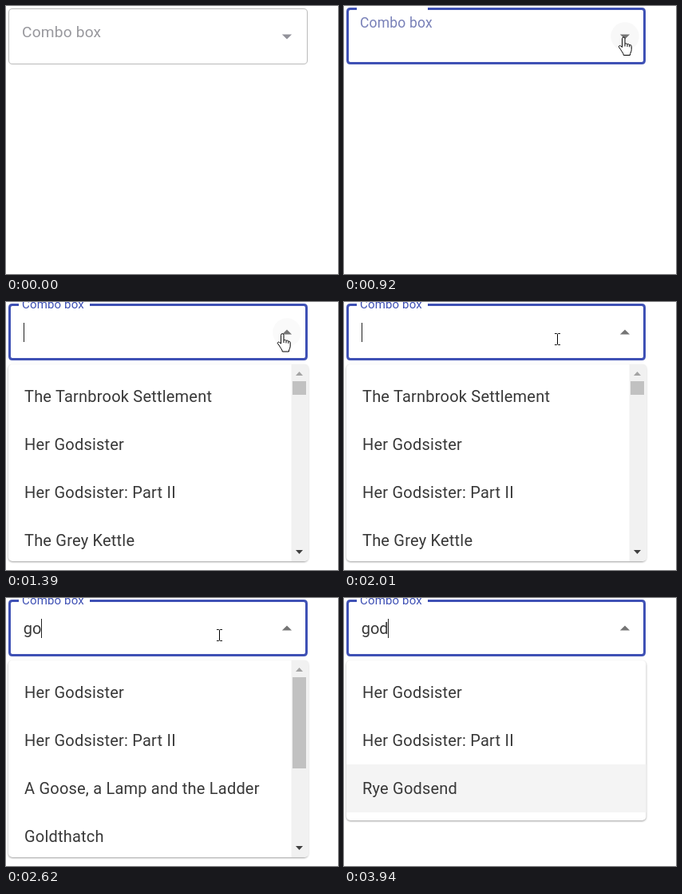
Write an HTML page that moves like this. It is 416 px wide and 335 px high and loops after 4440 ms.

```html
<!DOCTYPE html>
<html lang="en">
<head>
<meta charset="utf-8">
<title>Combo box</title>
<style>
  html, body { margin: 0; width: 100%; height: 100%; overflow: hidden; background: #fff; }
  svg { display: block; }
  text { font: 20px Roboto, Arial, sans-serif; letter-spacing: .21px; fill: #383838; white-space: pre; }
  #typed { letter-spacing: 0; }
  #sheet { filter: drop-shadow(0 1px 1.2px rgba(0, 0, 0, .38)); }
  .cursor { stroke: #000; fill: #fff; stroke-linejoin: round; }
</style>
</head>
<body>
<svg width="416" height="335" viewBox="0 0 416 335">
  <path id="frame" fill="none"/>
  <text id="label">Combo box</text>
  <text id="typed" x="21.7" y="45"></text>
  <rect id="caret" y="26" width="1" height="24" fill="#222"/>
  <circle id="ripple" cx="352" cy="38" r="17.8" fill="#f3f3f3"/>
  <path id="arrow" d="M-6.1-2.5H6.1L0 3.4Z"/>

  <g id="panel">
    <rect id="sheet" x="3" y="78" width="375.5" rx="5" fill="#fff"/>
    <rect id="hover" x="3" width="375.5" height="60" fill="#f4f4f4"/>
    <g id="rows"></g>
    <g id="bar">
      <path d="M357.5 78H374.5a5 5 0 0 1 5 5V319a5 5 0 0 1-5 5H357.5Z" fill="#f1f1f1"/>
      <path d="M363 92L367.5 87L372 92Z" fill="#a3a3a3"/>
      <path d="M363 310L367.5 315L372 310Z" fill="#404040"/>
      <rect id="thumb" x="359" y="99" width="17" fill="#c1c1c1"/>
    </g>
  </g>

  <g id="point" class="cursor">
    <path d="M0 0V20L4.6 15.7L7.6 22.5L10.6 21.2L7.7 14.5H14Z"/>
  </g>
  <g id="hand" class="cursor">
    <path d="M-1.4 13V2.3a1.7 1.7 0 0 1 3.4 0V9c.5-1 2.8-.8 3 .6c.6-.9 2.6-.6 2.8.8c.7-.6 2.4-.2 2.4 1.4V16c0 3-1.8 4-1.8 7H.3c0-2.5-2.5-4.5-3.6-7L-5.6 12.8c-.6-1 .9-2.5 2.3-1.3Z"/>
    <path d="M2 9V12M5 9.8V12.4M7.8 10.5V12.8" fill="none"/>
  </g>
  <g id="beam" class="cursor">
    <path d="M-3.5-6.5H-1L0-5.8L1-6.5H3.5M0-5.8V6.8M-3.5 7.5H-1L0 6.8L1 7.5H3.5" fill="none"/>
  </g>
</svg>
<script>
const LOOP = 4440;
const $ = id => document.getElementById(id);
const set = (id, attrs) => {
  for (const k in attrs) $(id).setAttribute(k, attrs[k]);
};
const show = (id, on) => { $(id).style.display = on ? '' : 'none'; };

const titles = [
  'The Tarnbrook Settlement', 'Her Godsister', 'Her Godsister: Part II',
  'The Grey Kettle', 'A Goose, a Lamp and the Ladder', 'Goldthatch', 'Rye Godsend'
];

// Each table holds [start, ...values]; a step lasts until the next one.
const cursorSteps = [
  [0, ''],
  [150, 'point', 318, 314], [220, 'point', 328, 235], [300, 'point', 336, 155],
  [370, 'point', 341, 95], [450, 'hand', 342.5, 58], [530, 'hand', 342.5, 48.5],
  [620, 'hand', 346.5, 42.5], [690, 'hand', 350, 38.5], [1390, 'hand', 346, 39],
  [1470, 'beam', 305.5, 43], [1550, 'beam', 267.5, 46], [3330, 'beam', 266.5, 46],
  [3400, 'hand', 277, 96], [3480, 'hand', 302, 170], [3550, 'hand', 335, 251],
  [3630, '']
];
const labelSteps = [
  [0, .172, '#98989d'], [70, 0, '#7a7a7a'], [920, .5, '#7880b8'],
  [1000, .88, '#6671b8'], [1080, .96, '#5a66b6'], [1150, 1, '#3f51b5']
];
const typedSteps = [[0, '', 17], [2320, 'g', 42], [2620, 'go', 114], [2870, 'god', 0]];
const caretSteps = [[0, 0], [1000, 1], [1470, 0], [2010, 1], [3400, 0], [3940, 1]];
const panelSteps = [[0, 0], [1000, .7], [1080, 1]];
const rippleSteps = [[0, 0], [920, .6], [1000, 1], [1230, .8], [1310, .6], [1390, .4], [1470, 0]];

const at = (steps, t) => steps.filter(s => s[0] <= t).pop().slice(1);

function outline(inset, top, bottom, gapStart, gapEnd) {
  const l = 3 + inset, r = 378 - inset, c = 5 - inset;
  return `M${gapStart} ${top}H${l + c}Q${l} ${top} ${l} ${top + c}V${bottom - c}` +
    `Q${l} ${bottom} ${l + c} ${bottom}H${r - c}Q${r} ${bottom} ${r} ${bottom - c}` +
    `V${top + c}Q${r} ${top} ${r - c} ${top}H${gapEnd}`;
}

function drawField(t) {
  const focused = t >= 920;
  const [lift, tint] = at(labelSteps, t);
  const scale = 1 - .25 * lift;
  const baseline = 38 - 35.2 * lift + 7 * scale;
  set('frame', {
    d: focused ? outline(1.5, 3.5, 71.5, 16, 105) : outline(.5, 3.5, 72.5, 60, 60),
    stroke: focused ? '#3f51b5' : t >= 450 ? '#212121' : '#bababa',
    'stroke-width': focused ? 3 : 1
  });
  set('label', { transform: `translate(20 ${baseline}) scale(${scale})` });
  $('label').style.fill = tint;
  set('ripple', { opacity: at(rippleSteps, t)[0] });
  set('arrow', {
    transform: `translate(352 38) rotate(${t >= 1000 ? 180 : 0})`,
    fill: t < 70 ? '#92929a' : '#757575'
  });
}

function drawPanel(t, pointer, y) {
  const [typed, thumb] = at(typedSteps, t);
  const list = titles.filter(s => s.toLowerCase().includes(typed)).slice(0, 4);
  const opacity = at(panelSteps, t)[0];
  $('typed').textContent = typed;
  show('caret', at(caretSteps, t)[0]);
  set('caret', { x: 22 + 11 * typed.length });
  set('panel', { opacity });
  show('panel', opacity);
  set('sheet', { height: thumb ? 246 : 200 });
  show('bar', thumb);
  set('thumb', { height: thumb });
  [...$('rows').children].forEach((row, i) => { row.textContent = list[i] || ''; });

  // The last row stays lit after the pointer has left.
  const row = t >= 3550 ? 2 : pointer === 'hand' && t >= 3400 ? Math.floor((y - 88) / 60) : -1;
  show('hover', row >= 0);
  set('hover', { y: 88 + 60 * row });
}

function draw(t) {
  const [pointer, x, y] = at(cursorSteps, t);
  drawField(t);
  drawPanel(t, pointer, y);
  for (const id of ['point', 'hand', 'beam']) {
    show(id, id === pointer);
    if (id === pointer) set(id, { transform: `translate(${x} ${y})` });
  }
}

for (let i = 0; i < 4; i++) {
  const row = document.createElementNS('http://www.w3.org/2000/svg', 'text');
  row.setAttribute('x', 23);
  row.setAttribute('y', 125 + 60 * i);
  $('rows').append(row);
}

const start = performance.now();
function tick() {
  draw((performance.now() - start) % LOOP);
  requestAnimationFrame(tick);
}
tick();
</script>
</body>
</html>
```
